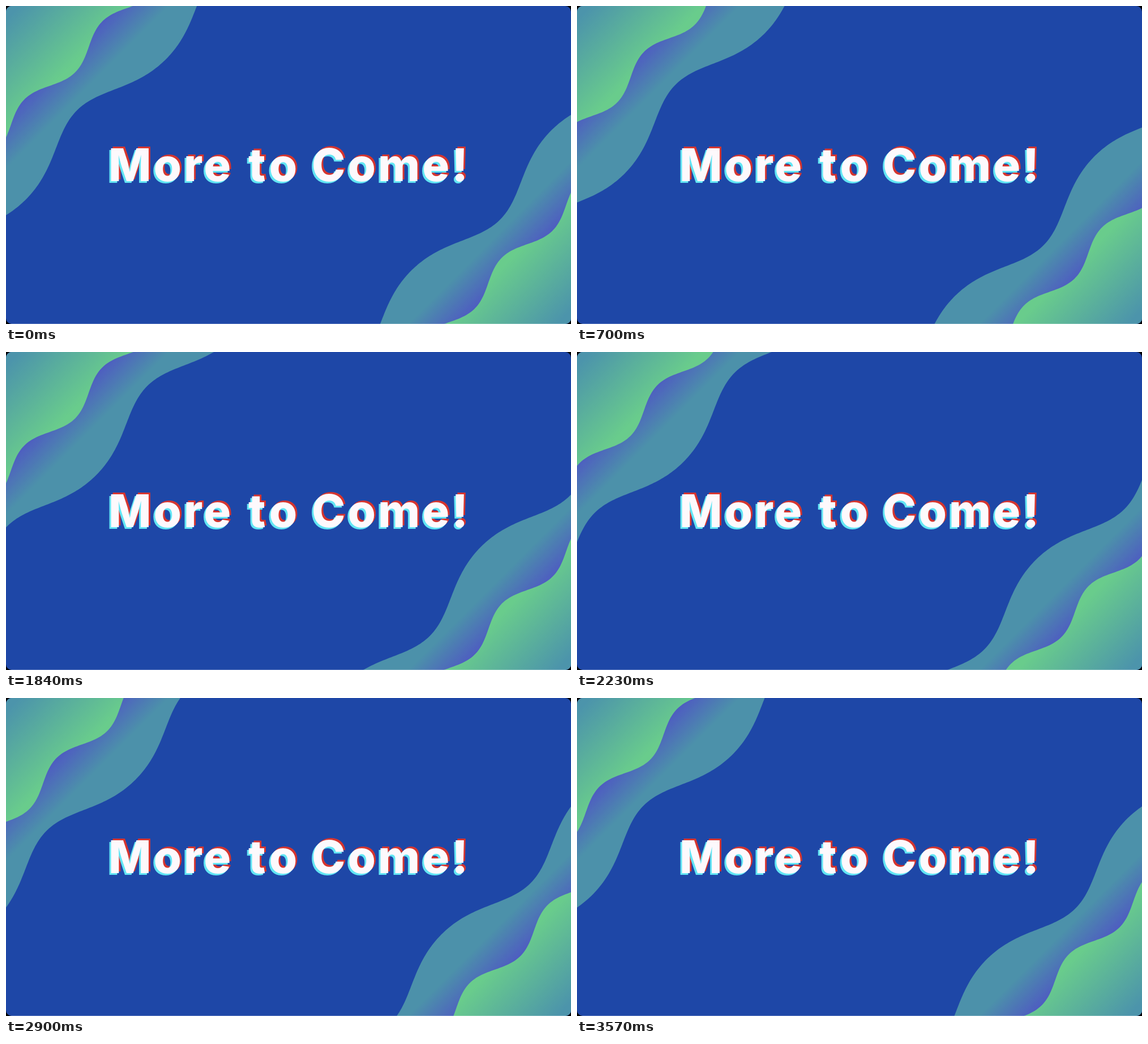
Write an HTML page that moves like this. It is 998 px wide and 561 px high and loops after 3.67 s.

```html
<!DOCTYPE html>
<html lang="en">
<head>
<meta charset="utf-8">
<title>More to Come!</title>
<style>
  html, body { margin: 0; width: 100%; height: 100%; overflow: hidden; background: #000; }
  svg { display: block; width: 100vw; height: 100vh; }
  text { font: 800 80px Inter, "Open Sans", sans-serif; letter-spacing: 4px; }
</style>
</head>
<body>
<svg viewBox="0 0 998 561" preserveAspectRatio="none">
  <defs>
    <clipPath id="card"><rect width="998" height="561" rx="10"/></clipPath>
    <!-- both gradients run down the diagonal, x + y from 0 to 300 -->
    <linearGradient id="leaf" gradientUnits="userSpaceOnUse" x1="0" y1="0" x2="150" y2="150">
      <stop offset=".08" stop-color="#4c94ab"/>
      <stop offset=".74" stop-color="#69cc8c"/>
    </linearGradient>
    <linearGradient id="sea" gradientUnits="userSpaceOnUse" x1="0" y1="0" x2="150" y2="150">
      <stop offset=".65" stop-color="#4e5cc1"/>
      <stop offset=".96" stop-color="#4c91aa"/>
    </linearGradient>
    <g id="waves">
      <path id="outer" fill="url(#sea)"/>
      <path id="inner" fill="url(#leaf)"/>
    </g>
    <g id="words">
      <text x="181" y="308.5">More</text>
      <text x="428" y="308.5" style="letter-spacing:7px">to</text>
      <text x="540" y="308.5">Come!</text>
    </g>
  </defs>
  <g clip-path="url(#card)">
    <rect width="998" height="561" fill="#1e47a7"/>
    <use href="#waves"/>
    <use href="#waves" transform="rotate(180 499 280.5)"/>
    <rect y="560" width="998" height="1" fill="#fff" opacity=".25"/>
    <use href="#words" x="3" y="-3" fill="#d5352f"/>
    <use href="#words" x="-3" y="3" fill="#62e5f4"/>
    <use href="#words" fill="#fdf9fc"/>
  </g>
</svg>
<script>
const LOOP = 3670;
const TAU = Math.PI * 2;
const outer = document.getElementById('outer');
const inner = document.getElementById('inner');

// step number and its start time; steps between are evenly spaced
const marks = [[0, 0], [7, 700], [12, 1170], [13, 1260], [18, 1750], [19, 1840],
  [24, 2330], [25, 2430], [30, 2900], [31, 3000], [36, 3480], [37, 3570]];
const starts = [0];
for (let m = 1; m < marks.length; m++) {
  const [i0, t0] = marks[m - 1], [i1, t1] = marks[m];
  for (let i = i0 + 1; i <= i1; i++) {
    starts.push(Math.round((t0 + (t1 - t0) * (i - i0) / (i1 - i0)) / 10) * 10);
  }
}

// both bands drift in and out of the corner twice per loop
const sway = p => Math.cos(TAU * (2 * p - 0.24));

// distance from the corner (x + y) as a function of position across (x - y)
function outerEdge(w, p) {
  const a = TAU * (w / 495 - p - 0.381);
  return 345 + 6 * sway(p) + 33.5 * Math.cos(a) - 2.5 * Math.cos(2 * a);
}

function innerEdge(w, p) {
  return 218 + 3.5 * sway(p) + 21 * Math.cos(TAU * (w / 275 + 2 * p - 0.02));
}

function wavePath(edge, p) {
  let d = 'M-300 -300';
  for (let w = -460; w <= 460; w += 5) {
    const s = edge(w, p);
    d += `L${((s + w) / 2).toFixed(2)} ${((s - w) / 2).toFixed(2)}`;
  }
  return d + 'Z';
}

function draw(time) {
  const t = time % LOOP;
  let i = starts.length - 1;
  while (i > 0 && starts[i] > t) i--;
  const p = starts[i] / LOOP;
  outer.setAttribute('d', wavePath(outerEdge, p));
  inner.setAttribute('d', wavePath(innerEdge, p));
}

const begin = performance.now();
function tick() {
  draw(performance.now() - begin);
  requestAnimationFrame(tick);
}
tick();
</script>
</body>
</html>
```
